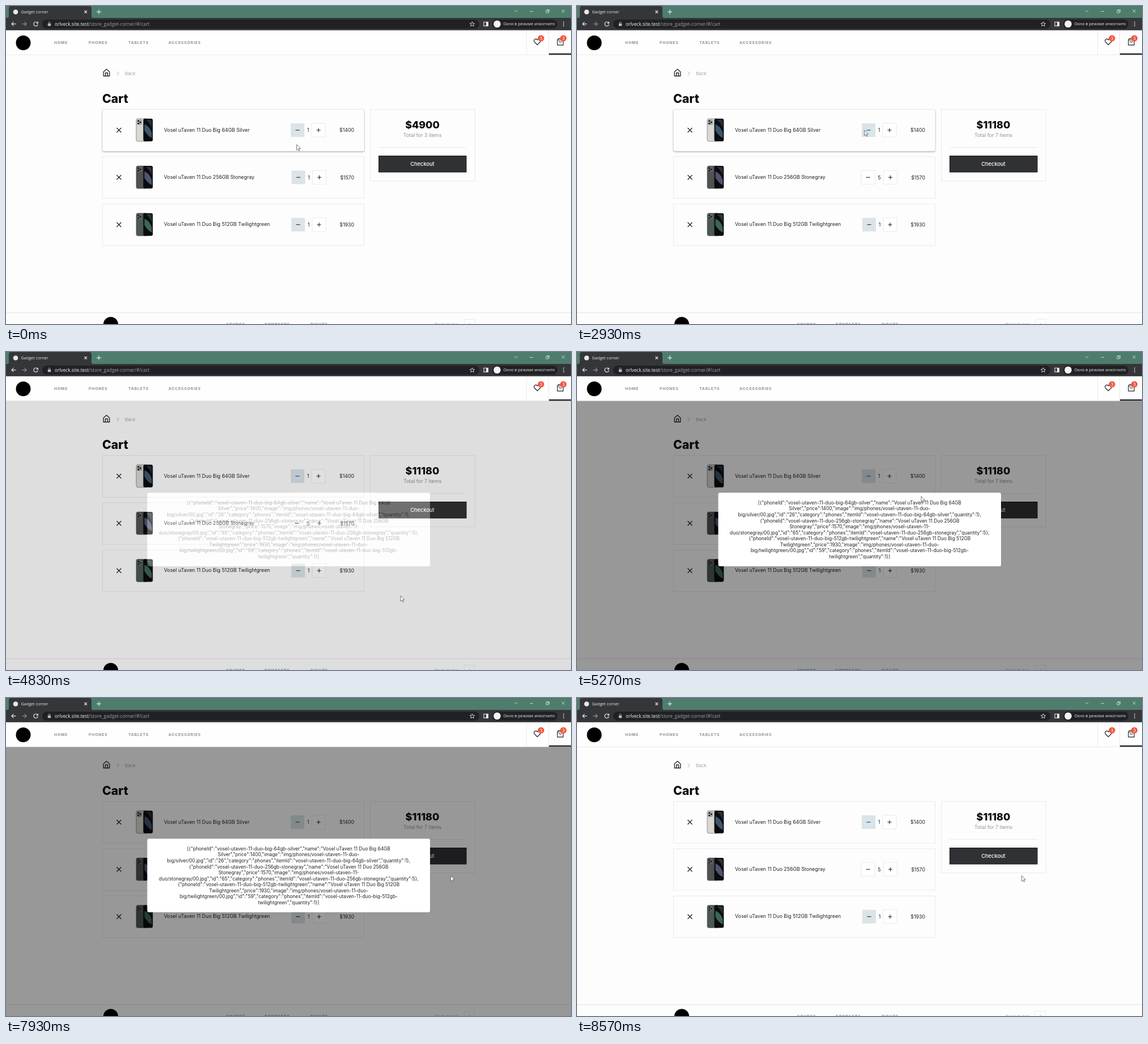
Recreate the animation shown at these times as an HTML page. Size 998 px wide and 561 px high, loop 8610 ms.

```html
<!DOCTYPE html>
<html lang="en">
<head>
<meta charset="utf-8">
<title>Gadget corner</title>
<style>
  html, body { margin: 0; width: 100%; height: 100%; overflow: hidden; background: #fdfdfd; }
  svg { display: block; font-family: Inter, "Open Sans", sans-serif; }
  .ui { font-family: "Open Sans", "Noto Sans", sans-serif; }
  .hover { filter: drop-shadow(0 1.6px .8px rgba(0, 0, 0, .35)); }
</style>
</head>
<body>
<svg id="stage" width="998" height="561" viewBox="0 0 998 561"></svg>
<script>
const LOOP = 8610;
const INK = '#232327', GREY = '#89939a', EDGE = '#e8eaef', FILL = '#dbe4e7';

const text = (x, y, size, str, fill = INK, more = '') =>
  `<text x="${x}" y="${y}" font-size="${size}" fill="${fill}" ${more}>${str}</text>`;
const rect = (x, y, w, h, fill, more = '') =>
  `<rect x="${x}" y="${y}" width="${w}" height="${h}" fill="${fill}" ${more}/>`;
const path = (d, color = INK, width = 1, more = '') =>
  `<path d="${d}" fill="none" stroke="${color}" stroke-width="${width}" ${more}/>`;
const dot = (x, y, r, fill) => `<circle cx="${x}" cy="${y}" r="${r}" fill="${fill}"/>`;
const box = (x, y, w, h, more = '') => rect(x, y, w, h, '#fdfdfd', `stroke="${EDGE}" ${more}`);
const MID = 'text-anchor="middle" ', END = 'text-anchor="end" ', BOLD = 'font-weight="800"';

const items = [
  { name: 'Vosel uTaven 11 Duo Big 64GB Silver', price: 1400, cy: 219, plusX: 540,
    back: '#d9d8d3', screen: '#3e566c' },
  { name: 'Vosel uTaven 11 Duo 256GB Stonegray', price: 1570, cy: 302.3, plusX: 541.5,
    back: '#505153', screen: '#50546e' },
  { name: 'Vosel uTaven 11 Duo Big 512GB Twilightgreen', price: 1930, cy: 385.7, plusX: 541,
    back: '#4b5952', screen: '#3c6652' },
];

// [time, item, change in quantity]
const clicks = [
  [420, 0, 1], [590, 0, 1], [760, 0, 1], [930, 0, 1],
  [1560, 1, 1], [1700, 1, 1], [1840, 1, 1], [1980, 1, 1],
  [2440, 0, -1], [2570, 0, -1], [2700, 0, -1], [2830, 0, -1],
];

// [time, x, y]
const route = [
  [0, 513.5, 244.5], [350, 553, 219], [1180, 553, 219], [1480, 553, 303], [2060, 553, 303],
  [2380, 507.5, 219], [3100, 507.5, 219], [4000, 735, 281], [4640, 735, 281],
  [4830, 697, 430], [5250, 608, 254.5], [5700, 608, 254.5], [6400, 560, 302],
  [7000, 590, 346], [7700, 785.5, 313.5], [LOOP, 785.5, 313.5],
];

const clamp = v => Math.max(0, Math.min(1, v));
const ease = v => v * v * (3 - 2 * v);

function pointer(t) {
  const i = route.findIndex(p => p[0] > t);
  const [t0, x0, y0] = route[i - 1], [t1, x1, y1] = route[i];
  const k = ease((t - t0) / (t1 - t0));
  return [x0 + (x1 - x0) * k, y0 + (y1 - y0) * k];
}

const modalOpacity = t => clamp((t - 4680) / 500) * (1 - clamp((t - 8030) / 400));

function phone({ cy, back, screen }) {
  const y = cy - 20.2;
  return rect(230, y, 20, 40, back, 'rx="3.2" stroke="#55565a" stroke-width=".6"')
    + rect(231.2, y + 1.4, 9, 9.6, '#77787a', 'rx="2.5" opacity=".5"')
    + dot(233.8, y + 4, 1.5, '#17181a') + dot(233.8, y + 8.4, 1.5, '#17181a')
    + dot(237.3, y + 6.2, 1.5, '#17181a')
    + rect(242.5, y, 16.8, 40, '#0b0c10', 'rx="3"')
    + `<path d="M244.5 ${y + 10}q9 3 13 15v9q-7-3-13-13z" fill="${screen}"/>`
    + `<path d="M247 ${y + 2}q8 6 10.5 16v-13q0-3-3-3z" fill="${screen}" opacity=".5"/>`;
}

function button(x, cy, sign, filled, color = INK) {
  const cx = x + 12;
  return rect(x, cy - 12, 24, 24, filled ? FILL : '#fff', filled ? '' : `stroke="${EDGE}"`)
    + path(`M${cx - 3.5} ${cy}h7` + (sign > 0 ? `M${cx} ${cy - 3.5}v7` : ''), color,
      color === INK ? 1.1 : 1.6);
}

function cart(t, [mx, my], open) {
  const done = clicks.filter(c => c[0] <= t);
  const count = items.map((_, i) => done.reduce((n, c) => n + (c[1] === i ? c[2] : 0), 1));
  const sum = items.reduce((s, item, i) => s + item.price * count[i], 0);
  const total = count.reduce((a, b) => a + b);

  const rows = items.map((item, i) => {
    const { cy, plusX, name, price } = item, n = count[i];
    const minusX = plusX - (n === 1 ? 37 : 39.3);
    const over = (x, w, h) => !open && mx >= x && mx <= x + w && Math.abs(my - cy) <= h;
    const pressed = done.some(c => c[1] === i && c[2] < 0);
    return box(170.5, cy - 36.5, 462, 73.5, over(170, 463, 37) ? 'class="hover" rx="2"' : '')
      + path(`M195.5 ${cy - 4}l8 8m0-8l-8 8`, INK, 1.3)
      + phone(item)
      + text(279, cy + 2.7, 8.8, name)
      + button(minusX, cy, -1, n === 1 || over(minusX, 24, 12), pressed ? '#2880e8' : INK)
      + text((minusX + 24 + plusX) / 2, cy + 3.2, 8.8, n, INK, MID)
      + button(plusX, cy, 1, over(plusX, 24, 12))
      + text(615, cy + 3.2, 8.8, '$' + price, INK, END);
  }).join('');

  return rows + box(643.5, 182.5, 185, 126)
    + text(735.5, 215.5, 17.9, '$' + sum, '#0c0c0e', MID + BOLD)
    + text(735.5, 231, 8.9, `Total for ${total} items`, GREY, MID)
    + path('M658 249.5h155', EDGE)
    + rect(658.5, 264.5, 154.5, 28.5, '#303134', 'stroke="#141416"')
    + text(735.5, 281.8, 9.3, 'Checkout', '#fff', MID + 'font-weight="500"');
}

const caps = 'font-weight="700" letter-spacing=".85"';

const page = rect(0, 86, 998, 475, '#fdfdfd')
  + path('M172.2 116.2l5.3-4.7 5.3 4.7v7.3h-10.6zM175.5 123.5v-5.5h4v5.5', INK, 1.3,
    'stroke-linejoin="round"')
  + path('M195.8 115.5l3.5 3.5-3.5 3.5', '#a5adb5')
  + text(210, 122, 8, 'Back', '#a0a7ad')
  + text(170, 171.3, 21.3, 'Cart', '#0c0c0e', BOLD)
  + path('M0 541h998', '#dfe1e4')
  + dot(185, 561.5, 13, '#000')
  + text(389, 564.2, 6.8, 'SOURCE', GREY, caps)
  + text(456.5, 564.2, 6.8, 'CONTACTS', GREY, caps)
  + text(538, 564.2, 6.8, 'RIGHTS', GREY, caps)
  + text(757, 564.5, 8, 'Back to top', '#a0a7ad')
  + box(809.5, 552.5, 18.5, 18.5)
  + path('M816.5 562.5l2-2 2 2', INK, .9);

const slug = 'vosel-utaven-11-duo';
const order = [
  `[{"phoneId":"${slug}-big-64gb-silver","name":"Vosel uTaven 11 Duo Big 64GB`,
  'Silver","price":1400,"image":"img/phones/vosel-utaven-11-duo-',
  `big/silver/00.jpg","id":"26","category":"phones","itemId":"${slug}-big-64gb-silver","quantity":1},`,
  `{"phoneId":"${slug}-256gb-stonegray","name":"Vosel uTaven 11 Duo 256GB`,
  'Stonegray","price":1570,"image":"img/phones/vosel-utaven-11-',
  `duo/stonegray/00.jpg","id":"65","category":"phones","itemId":"${slug}-256gb-stonegray","quantity":5},`,
  `{"phoneId":"${slug}-big-512gb-twilightgreen","name":"Vosel uTaven 11 Duo Big 512GB`,
  'Twilightgreen","price":1930,"image":"img/phones/vosel-utaven-11-duo-',
  `big/twilightgreen/00.jpg","id":"59","category":"phones","itemId":"${slug}-big-512gb-`,
  'twilightgreen","quantity":1}]',
];
const modal = rect(0, 86, 998, 475, '#000', 'opacity=".4"')
  + rect(249.5, 248.3, 499.5, 129.7, '#fff', 'rx="3"')
  + order.map((line, i) => text(499.3, 268.9 + i * 10.55, 8.35, line, INK, MID)).join('');

const badge = x => dot(x, 57, 5.6, '#f2543f') + text(x, 59.8, 7.6, 3, '#fff', MID);
const nav = [[85, 'HOME'], [146, 'PHONES'], [216, 'TABLETS'], [287, 'ACCESSORIES']];
const header = rect(0, 42, 998, 44, '#fefefe')
  + path('M0 86h998M919.5 43v43M958.5 43v43', EDGE)
  + rect(959, 83.5, 39, 2.7, '#313237')
  + dot(30.5, 65, 13, '#000')
  + nav.map(([x, label]) => text(x, 66.8, 6.8, label, GREY, caps)).join('')
  + path('M938.5 68.5l-5-5c-2.6-4 2.5-7.5 5-3.8 2.5-3.7 7.6-.2 5 3.8z', INK, 1.2)
  + path('M974 60l1.8-2.6h6.6l1.8 2.6v8.8h-10.2zM974 60h10.2M976.8 62.2q2.3 3.6 4.6 0', INK, 1.2)
  + badge(945) + badge(984.5);

const LIGHT = '#e6e8ea', DIM = '#8d9095';
const browser = '<g class="ui">'
  + rect(0, 0, 998, 22, '#4f7d6d')
  + `<path d="M1 21.5q4 0 4-4V4q0-4 4-4h138q4 0 4 4v13.5q0 4 4 4z" fill="#35363a"/>`
  + rect(0, 21, 998, 21.8, '#35363a')
  + dot(17, 10.5, 4.3, LIGHT)
  + text(26.5, 13, 7.2, 'Gadget corner', LIGHT)
  + path('M138.5 8l4.5 4.5m0-4.5l-4.5 4.5M160 10.3h8M164 6.3v8', LIGHT, 1.2)
  + path('M898 7.7l2.6 2.6 2.6-2.6M925.5 9.5h5.5M954 8h4v4h-4zM955.5 8v-1.5h4v4h-1.5M981.7 6.5l5 5m0-5l-5 5',
    '#d5dfda', .9)
  + path('M17.5 31.7h-7.5m3.4-3.5l-3.5 3.5 3.5 3.5', LIGHT, 1.2)
  + path('M28.5 31.7h7.5m-3.4-3.5l3.5 3.5-3.5 3.5', DIM, 1.2)
  + path('M55.5 29.3a3.7 3.7 0 1 0 .8 3.2M56.3 27.7v2.6h-2.6', LIGHT, 1.2)
  + rect(64, 24, 772, 16, '#202124', 'rx="8"')
  + rect(73.8, 31, 5.4, 4.2, '#b9bcc0', 'rx=".6"')
  + path('M75 31v-1.4a1.5 1.5 0 0 1 3 0v1.4', '#b9bcc0', .9)
  + text(86, 34.7, 8.3, 'orlveck.site.test<tspan fill="#9aa0a6">/store_gadget-corner/#/cart</tspan>', '#f4f5f6')
  + path('M823.5 27.8l1.2 2.7 2.9.3-2.2 1.9.7 2.9-2.6-1.6-2.6 1.6.7-2.9-2.2-1.9 2.9-.3z', LIGHT, .9)
  + path('M844 28.3h7.5v6.8h-7.5z', LIGHT, 1.1) + rect(848, 28, 4, 7.4, LIGHT)
  + rect(859, 24, 115, 16, '#202124', 'rx="8"')
  + dot(867.5, 31.7, 6.3, '#f1f3f4')
  + text(878.5, 34.3, 7.1, 'Окно в режиме инкогнито', LIGHT)
  + [28.4, 31.7, 35].map(y => dot(985, y, .9, LIGHT)).join('')
  + '</g>';

const arrow = '<path d="M0 0v9.6l2.2-2 1.6 3.5 1.6-.7-1.6-3.4h3z" fill="#fff" stroke="#55565a" stroke-width=".8"/>';

stage.innerHTML = `${page}<g id="list"></g><g id="dialog">${modal}</g>${header}${browser}<g id="mouse">${arrow}</g>`;
const [list, dialog, mouse] = ['list', 'dialog', 'mouse'].map(id => document.getElementById(id));

const start = performance.now();
let shown = '';
function draw() {
  const t = (performance.now() - start) % LOOP;
  const at = pointer(t), opacity = modalOpacity(t);
  const markup = cart(t, at, opacity > 0);
  if (markup !== shown) list.innerHTML = shown = markup;
  dialog.setAttribute('opacity', opacity);
  mouse.setAttribute('transform', `translate(${at})`);
  requestAnimationFrame(draw);
}
draw();
</script>
</body>
</html>
```
